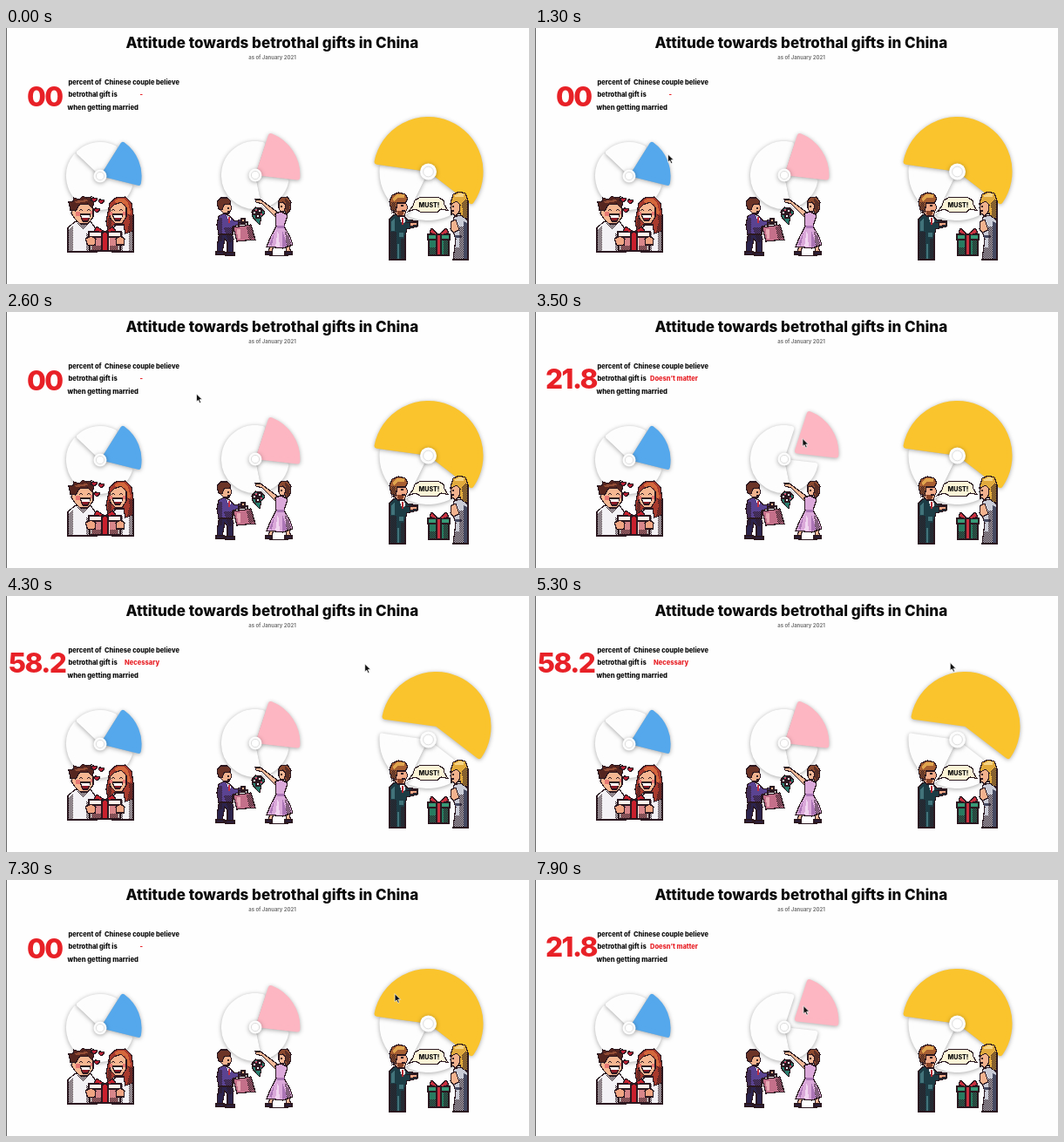
An HTML page that plays this animation: 600 px wide and 294 px high, repeating every 8000 ms.

```html
<!DOCTYPE html>
<html lang="en">
<head>
<meta charset="utf-8">
<title>Attitude towards betrothal gifts in China</title>
<style>
html, body { margin: 0; width: 100%; height: 100%; overflow: hidden; background: #fefefe; }
svg { display: block; width: 600px; height: 294px; }
text { font-family: Inter, "Open Sans", sans-serif; font-weight: 800; font-size: 7.5px; fill: #0b0b0b; white-space: pre; }
.red { fill: #e82127; }
#num { font-size: 31.6px; letter-spacing: -1.6px; }
.lift { filter: drop-shadow(0 1px 2.4px #0005); }
.art { shape-rendering: crispEdges; stroke: #2b1820; stroke-width: 1.2; }
.art .flat, .art .shade { stroke: none; }
.art .shade { fill: url(#dots); }
.art .line { fill: none; }
</style>
</head>
<body>
<svg viewBox="0 0 600 294">
  <pattern id="dots" width="2" height="2" patternUnits="userSpaceOnUse">
    <path d="M0 0h1v1h-1zM1 1h1v1h-1z" fill="#2b1820" shape-rendering="crispEdges"/>
  </pattern>
  <rect width="1" height="294" fill="#666"/>
  <text x="305.3" y="23" text-anchor="middle" style="font-size:17.05px">Attitude towards betrothal gifts in China</text>
  <text x="305.5" y="36" text-anchor="middle" style="font-size:5.9px;font-weight:700;fill:#777">as of January 2021</text>
  <text x="71.5" y="65">percent of  Chinese couple believe</text>
  <text x="71.5" y="79.3">betrothal gift is</text>
  <text x="70.5" y="94" style="font-size:7.7px">when getting married</text>
  <text id="num" class="red"></text>
  <text id="word" class="red" y="79.3"></text>
  <g id="wheels"></g>

  <!-- laughing pair sharing a gift -->
  <g class="art">
    <path fill="#f3f1f5" d="M71 257V229L80 222H97L104 232V257Z"/>
    <path fill="#f3f1f5" d="M122 257V230L128 225H138L146 230V257Z"/>
    <path class="shade" d="M72 256V232L77 228V256ZM141 256V230L146 232V256ZM82 226L89 232L94 226V223H82ZM92 236H97V256H92ZM131 234H134V256H131Z"/>
    <path fill="#a83a2d" d="M117 233L115 222L119 201L126 195L137 194L144 201L146 215V233L137 236L135 226H124Z"/>
    <path fill="#d4683c" class="flat" d="M124 199L129 196H135L140 201L143 212L140 215L137 202H127Z"/>
    <path class="shade" d="M117 230L117 219L121 208V231ZM139 234L142 222L140 214L146 216V233Z"/>
    <path fill="#f6b792" d="M76 207H80L83 200H96L100 207V217L94 225H85L79 219L75 213Z"/>
    <path fill="#f6b792" d="M119 208L124 203L132 200L138 206V217L133 225H126L120 219Z"/>
    <path fill="#55251f" d="M74 209L72 200L77 199L78 195L84 197L88 193L92 195L98 194L97 198L101 200L99 207L94 202L84 203L80 210Z"/>
    <path fill="#934c35" class="flat" d="M77 200L84 198L93 197L94 199L82 201Z"/>
    <path fill="#8d1c28" d="M85 214H97L94 222H88ZM122 214H134L131 221H125Z"/>
    <path fill="#fff" class="flat" d="M86 214.6H96V217.6H87ZM123 214.6H133V217.6H124Z"/>
    <path fill="#e77a74" class="flat" d="M80 211h5v5h-5zM97 210h2v4h-2zM119 211h3v4h-3zM134 211h3v4h-3z"/>
    <path class="line" d="M84 210L86 208L88 210M93 210L95 208L97 210M121 210L123 208L125 210M130 210L132 208L134 210"/>
    <path fill="#f9e3dd" d="M96 236H131V256H96Z"/>
    <path fill="#d8868a" class="flat" d="M99 241H109V255H99ZM119 241H128V255H119Z"/>
    <path class="shade" d="M98 250H109V256H98ZM119 250H129V256H119Z"/>
    <path fill="#fff2ea" d="M95 234H132V240H95Z"/>
    <path fill="#c9202d" d="M110 234H117V256H110ZM113 234L104 228L101 233L112 235ZM114 234L122 228L126 233L115 235Z"/>
    <path fill="#f0a583" d="M91 242L98 239L103 242L102 249L94 250ZM126 242L131 239L136 242L135 249L127 249Z"/>
    <path fill="#ba2035" d="M101 200l-3-3l1-2h2l1 1l2-1l1 2zM109 202l-3-3l1-2h2l1 1l2-1l1 2zM104 212l-3-3l1-2h2l1 1l2-1l1 2z"/>
    <path class="line" d="M71 256.5H146"/>
  </g>

  <!-- refused bag and flowers -->
  <g class="art">
    <path fill="#2c244e" d="M245 233H258L261 242L260 259H254L254 246L251 242L248 258H242L243 246Z"/>
    <path fill="#5a4391" d="M244 216L250 213L257 216L262 222L271 220V225L260 228L260 237H244L242 226Z"/>
    <path class="shade" d="M243 218H248V245H244ZM250 229H259V246H255Z"/>
    <path fill="#fff" class="flat" d="M253 215L258 218L257 225Z"/>
    <path fill="#c13045" class="flat" d="M255 217h2v7h-2z"/>
    <path fill="#f2b38e" d="M247 201H257L259 207L256 213H250L246 209ZM270 219H274V225H270Z"/>
    <path fill="#6c3427" d="M244 208L242 200L246 195H254L258 199L257 202L250 203L248 209Z"/>
    <path class="line" d="M254 207H256M254 211H257M267 229V223H277V229"/>
    <path fill="#c4708a" d="M261 229L281 226L286 243L265 245Z"/>
    <path fill="#e9a9b5" class="flat" d="M265 231h4v11h-3z"/>
    <path class="shade" d="M276 228L281 227L285 242L279 243Z"/>
    <path fill="#287c6d" d="M282 211L286 206L293 207L297 212L293 217L291 226L287 222L283 217Z"/>
    <path fill="#f0edf2" d="M283 210h4v4h-4zM289 208h4v4h-4zM287 214h4v4h-4z"/>
    <path fill="#d74b70" class="flat" d="M286 208h2v2h-2zM292 213h2v2h-2z"/>
    <path fill="#8d4a2f" d="M312 200L315 195L323 194L327 200L326 209L322 214L316 204Z"/>
    <path class="shade" d="M320 196L326 200L325 209L322 212Z"/>
    <path fill="#f5b997" d="M313 201L318 200L321 204L319 211H315L313 207ZM286 197L292 197L312 212L309 217L294 202L287 200ZM321 250H325L327 258H322ZM303 249H307L305 258H301Z"/>
    <path fill="#dba9da" d="M309 213L316 211L323 215L319 228L326 240L329 249L318 253L299 251L304 239L310 228Z"/>
    <path fill="#ab75b5" class="flat" d="M311 227H320L319 230H311ZM317 233L323 250L317 252ZM308 235L305 250L302 249Z"/>
    <path fill="#f1d6f0" class="flat" d="M312 231L314 251L309 251Z"/>
    <path class="shade" d="M320 233L325 240L328 249L322 251Z"/>
    <path fill="#2c244e" d="M241 257H250V260H241ZM252 258H262V261H252ZM298 257H305V260H298ZM320 257H328V260H320Z"/>
    <path class="line" d="M302 261.5H324M315 205H317"/>
  </g>

  <!-- demanded gift -->
  <g class="art">
    <path fill="#1d3c45" d="M440 266V219L446 214H455L460 220L472 222V228L460 231L458 239V266Z"/>
    <path fill="#41737a" class="flat" d="M442 222L446 218V233H442ZM451 235H456V240H451ZM449 248h2v17h-2z"/>
    <path class="shade" d="M441 234H448V266H441ZM453 242H458V266H453Z"/>
    <path fill="#fff" class="flat" d="M451 215H457L458 222L455 227Z"/>
    <path fill="#b22a34" class="flat" d="M454 218h2v8h-2z"/>
    <path fill="#f0a987" d="M445 200H458L461 206L459 210L457 216H449L444 210ZM463 223L472 222V226L464 228Z"/>
    <path fill="#a75e32" d="M442 209L440 199L443 192L450 189L458 191L461 196L458 201L449 201L447 211Z"/>
    <path fill="#e0a54e" class="flat" d="M444 195L449 191H457V195H449L445 200Z"/>
    <path fill="#884329" class="flat" d="M448 210H457L455 215H450Z"/>
    <path class="shade" d="M442 200H447V213H442Z"/>
    <path class="line" d="M453 204H456M454 210H458M459 223.5H472"/>
    <path fill="#fbf4d7" d="M475 194.5H496L502 198L503 203L507 209.5L499 208L495 211.5H476L470 208L462 210.5L467 204L469 198Z"/>
    <path fill="#e1aa3d" d="M511 214L510 201L513 191L520 188L527 190L530 198V224L523 222L521 213Z"/>
    <path fill="#f6d486" class="flat" d="M514 193L520 190H525V194H516Z"/>
    <path class="shade" d="M523 200L528 196L530 200V222H525Z"/>
    <path fill="#f3b28e" d="M511 202L517 199L521 203L520 211L516 216L512 213L510 207Z"/>
    <path fill="#c9cbd6" d="M514 217L522 215L530 221V266H513L516 242L512 231Z"/>
    <path fill="#454961" class="flat" d="M525 222L529 224V265H525ZM515 238H523V241H515Z"/>
    <path class="shade" d="M520 228H525V265H520ZM514 252H520V265H514Z"/>
    <path fill="#f3b28e" d="M511 222L516 220L520 232L513 235L510 231Z"/>
    <path class="line" d="M512 205H514M511 210H514"/>
    <path fill="#277c61" d="M485 238H508V261H485Z"/>
    <path class="shade" d="M502 243H508V261H502ZM486 252H493V261H486Z"/>
    <path fill="#379a77" d="M484 237H509V243H484Z"/>
    <path fill="#cb3140" d="M494 237H499V261H494ZM495 236L488 230L486 235L494 238ZM498 236L505 230L508 235L499 238Z"/>
  </g>
  <text x="485.5" y="205.6" text-anchor="middle" style="font-size:7.1px">MUST!</text>

  <path id="cursor" d="M0 0V9L2.1 7.2L3.7 10.6L5.2 9.9L3.7 6.6H6.6Z" fill="#111" stroke="#fff" stroke-width=".7"/>
</svg>
<script>
const LOOP = 8000, ROUND = 3;
const $ = id => document.getElementById(id);
const share = [.218, .2, .582];

// Each wheel lifts one share: pink, blue or yellow.
const wheels = {
  blue:   { x: 108, y: 170, r: 39, big: 47.6, hub: 7.5, first: 1, from: -58, color: '#55a8ec', move: [11, -5] },
  pink:   { x: 286, y: 169, r: 39, big: 51.4, hub: 7.5, first: 0, from: -72, color: '#fdb6c2', move: [11, -7] },
  yellow: { x: 484.5, y: 165, r: 56, big: 63, hub: 9.5, first: 2, from: -172, color: '#fac42d', move: [9, -15] }
};

function add(parent, tag, attrs) {
  const el = document.createElementNS('http://www.w3.org/2000/svg', tag);
  for (const k in attrs) el.setAttribute(k, attrs[k]);
  return parent.appendChild(el);
}

// Sector inset by ROUND; a round-joined stroke fills it back out.
function sector(parent, r, from, sweep, color) {
  const rad = Math.PI / 180, a = from * rad, b = (from + sweep) * rad;
  const rim = r - ROUND, inset = Math.asin(ROUND / rim);
  const at = (d, t) => `${d * Math.cos(t)} ${d * Math.sin(t)}`;
  const tip = at(ROUND / Math.sin((b - a) / 2), (a + b) / 2);
  return add(parent, 'path', {
    d: `M${tip}L${at(rim, a + inset)}A${rim} ${rim} 0 ${+(sweep > 180)} 1 ${at(rim, b - inset)}Z`,
    fill: color, stroke: color, 'stroke-width': 2 * ROUND, 'stroke-linejoin': 'round', class: 'lift'
  });
}

for (const w of Object.values(wheels)) {
  const g = add($('wheels'), 'g', { transform: `translate(${w.x} ${w.y})` });
  const sweep = i => 360 * share[(w.first + i) % 3];
  const second = w.from + sweep(0);
  sector(g, w.r, second, sweep(1), '#fdfdfd');
  sector(g, w.r, second + sweep(1), sweep(2), '#fdfdfd');
  w.slice = sector(g, w.big, w.from, sweep(0), w.color);
  add(g, 'circle', { r: w.hub, fill: '#fcfcfc', class: 'lift' });
  add(g, 'circle', { r: w.hub * .62, fill: '#fff', stroke: '#ddd', 'stroke-width': 1 });
}

const labels = {
  none:   ['00', 24, 89.7, '-', 153.5],
  blue:   ['20.0', 3, 87.7, 'Unnecessary', 132],
  pink:   ['21.8', 12, 87.7, 'Doesn’t matter', 132],
  yellow: ['58.2', 3, 87.7, 'Necessary', 136]
};
const hovers = [[0, 'none'], [1500, 'blue'], [2400, 'none'], [3300, 'pink'], [4000, 'none'],
  [4200, 'yellow'], [7300, 'none'], [7800, 'pink']];
const path = [[700, 176, 268], [1300, 152.5, 145], [1600, 134, 152], [2200, 138, 150], [2600, 218.5, 94],
  [3400, 306, 146], [3800, 312, 142], [4300, 411.7, 78], [5300, 476.3, 76.6], [6400, 517.3, 119.3],
  [7000, 510, 124], [7800, 309, 145], [7900, 308, 144.5], [8000, 308, 144.5]];

function setText(el, text, x) {
  el.textContent = text;
  el.setAttribute('x', x);
}

function draw(t) {
  const name = hovers.findLast(h => h[0] <= t)[1];
  const [num, nx, ny, word, wx] = labels[name];
  setText($('num'), num, nx);
  $('num').setAttribute('y', ny);
  setText($('word'), word, wx);
  for (const k in wheels)
    wheels[k].slice.setAttribute('transform', `translate(${k === name ? wheels[k].move : '0,0'})`);

  const i = path.findIndex(p => p[0] > t);
  $('cursor').style.display = i > 0 ? '' : 'none';
  if (i > 0) {
    const [t0, x0, y0] = path[i - 1], [t1, x1, y1] = path[i];
    const k = (t - t0) / (t1 - t0), e = k * k * (3 - 2 * k);
    $('cursor').setAttribute('transform', `translate(${x0 + (x1 - x0) * e} ${y0 + (y1 - y0) * e})`);
  }
}

const start = performance.now();
function tick() {
  draw((performance.now() - start) % LOOP);
  requestAnimationFrame(tick);
}
tick();
</script>
</body>
</html>
```
